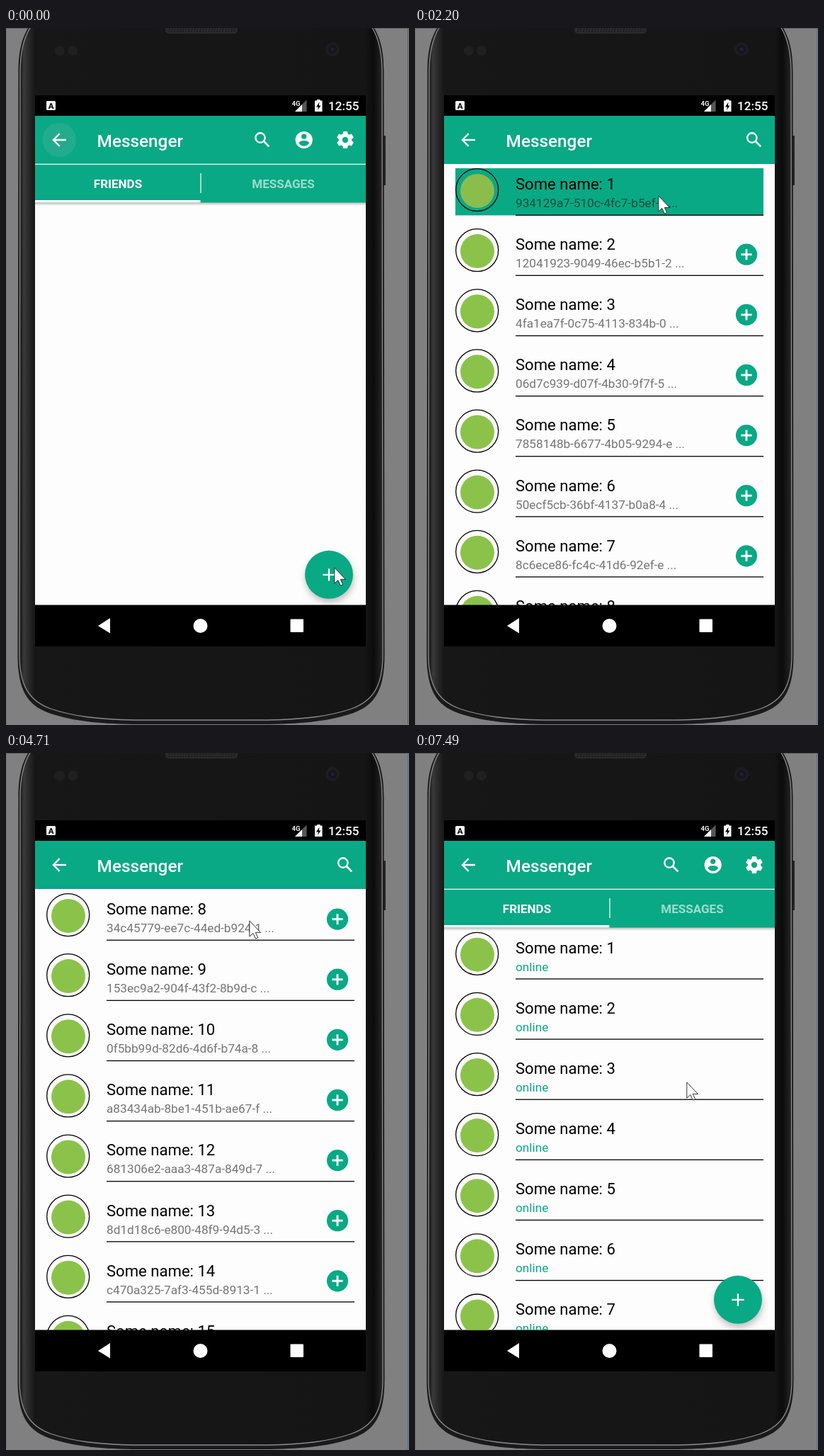
Write an HTML page with a canvas that moves like this. It is 569 px wide and 984 px high and loops after 8000 ms.

```html
<!DOCTYPE html>
<html lang="en">
<head>
<meta charset="utf-8">
<title>Messenger</title>
<style>
html, body { margin: 0; width: 100%; height: 100%; overflow: hidden; background: #808080; }
canvas { display: block; width: 100vw; height: 100vh; }
</style>
</head>
<body>
<canvas id="stage" width="569" height="984"></canvas>
<script>
const W = 569, H = 984, LOOP = 8000, PITCH = 85.12;
const GREEN = '#09a985', PAPER = '#fdfdfd', ROBOTO = 'Roboto, sans-serif';
const SCREEN = { x: 41, y: 95, w: 467, h: 778, bottom: 814.6 };

const codes = [
  '934129a7-510c-4fc7-b5ef-c', '12041923-9049-46ec-b5b1-2', '4fa1ea7f-0c75-4113-834b-0',
  '06d7c939-d07f-4b30-9f7f-5', '7858148b-6677-4b05-9294-e', '50ecf5cb-36bf-4137-b0a8-4',
  '8c6ece86-fc4c-41d6-92ef-e', '34c45779-ee7c-44ed-b924-1', '153ec9a2-904f-43f2-8b9d-c',
  '0f5bb99d-82d6-4d6f-b74a-8', 'a83434ab-8be1-451b-ae67-f', '681306e2-aaa3-487a-849d-7',
  '8d1d18c6-e800-48f9-94d5-3', 'c470a325-7af3-455d-8913-1'
];

const removals = [2440, 2960, 3080, 3720, 4120, 4540, 4710];
const presses = [[2200, 2420], [2680, 2930], [3480, 3690], [3870, 4090], [4330, 4510]];
const OPEN = 1110, TAP_BACK = 6680, CLOSE = 6920, CLOSED = 7170;

// Pointer keys: time, x, y
const pointer = [
  [395, 463, 761], [480, 443, 767], [1390, 443, 767], [1590, 377, 344], [1680, 377, 344],
  [1820, 353, 276], [1990, 343, 236], [5760, 343, 236], [5900, 255, 180], [6020, 150, 131],
  [6090, 110, 123], [6200, 73, 154], [7160, 73, 154], [7300, 260, 330], [7460, 383, 445],
  [7489, 383, 445], [7490, 383, 464]
];

const view = document.getElementById('stage').getContext('2d');
const layer = makeContext(), phone = makeContext();
let c = view;

function makeContext() {
  const canvas = document.createElement('canvas');
  canvas.width = W;
  canvas.height = H;
  return canvas.getContext('2d');
}

const clamp = v => Math.max(0, Math.min(1, v));
const span = (t, from, to) => clamp((t - from) / (to - from));

function box(x, y, w, h, color) {
  c.fillStyle = color;
  c.fillRect(x, y, w, h);
}

function disc(x, y, r, color) {
  c.fillStyle = color;
  c.beginPath();
  c.arc(x, y, r, 0, Math.PI * 2);
  c.fill();
}

function shape(points, fill) {
  c.beginPath();
  points.forEach(([x, y]) => c.lineTo(x, y));
  c.closePath();
  c.fillStyle = fill;
  c.fill();
}

function line(points, width, color) {
  c.beginPath();
  points.forEach(([x, y], i) => i ? c.lineTo(x, y) : c.moveTo(x, y));
  c.lineWidth = width;
  c.strokeStyle = color;
  c.stroke();
}

function label(str, x, y, size, color, weight = 400, align = 'left') {
  c.font = `${weight} ${size}px ${ROBOTO}`;
  c.textAlign = align;
  c.fillStyle = color;
  c.fillText(str, x, y);
}

function plus(x, y, r, width, color) {
  line([[x - r, y], [x + r, y]], width, color);
  line([[x, y - r], [x, y + r]], width, color);
}

// Phone outline, moved inwards at the sides and lifted at the bottom
function bodyPath(side, lift) {
  const left = 16.5 + side, right = 534.5 - side, base = 983 - lift;
  c.beginPath();
  c.moveTo(left + 16, -2);
  c.bezierCurveTo(left + 7, 12, left + 1, 30, left + 1, 62);
  c.lineTo(left, 885);
  c.bezierCurveTo(left, base - 48, left + 14, base - 27, left + 44, base - 16);
  c.bezierCurveTo(left + 76, base - 5, left + 112, base - 1, left + 162, base);
  c.lineTo(right - 162, base);
  c.bezierCurveTo(right - 112, base - 1, right - 76, base - 5, right - 44, base - 16);
  c.bezierCurveTo(right - 14, base - 27, right, base - 48, right, 885);
  c.lineTo(right - 1, 62);
  c.bezierCurveTo(right - 1, 30, right - 7, 12, right - 16, -2);
}

function drawPhone() {
  c = phone;
  box(0, 0, W, H, '#808080');
  box(0, 0, W, 1, '#626262');
  box(0, 0, 1, H, '#747474');
  box(532, 152, 4, 70, '#262626');

  bodyPath(0, 0);
  c.fillStyle = '#1a1a1a';
  c.fill();
  const sheen = c.createLinearGradient(17, 0, 534, 0);
  [[17, '#404040'], [21, '#1b1b1b'], [25, '#3a3a3a'], [32, '#292929'], [41, '#171717'],
   [508, '#151515'], [519, '#0b0b0b'], [527, '#1c1c1c'], [534, '#303030']]
    .forEach(([x, color]) => sheen.addColorStop((x - 17) / 517, color));
  bodyPath(2.5, 6);
  c.fillStyle = sheen;
  c.fill();
  c.lineWidth = 1.3;
  c.strokeStyle = '#8c8c8c';
  c.stroke();

  // Earpiece, sensors and front camera
  c.beginPath();
  c.roundRect(225, -8, 102, 16, 5);
  c.fillStyle = '#292929';
  c.fill();
  for (let x = 229; x < 325; x += 4) {
    for (let y = 1; y < 7; y += 3) box(x + y % 2, y, 2, 1, '#151515');
  }
  disc(76, 32, 7, '#202020');
  disc(94, 32, 7, '#202020');
  disc(461, 30, 10, '#1d1d1f');
  disc(461, 30, 6, '#15151f');
  disc(461, 30, 2.5, '#202038');

  box(SCREEN.x, SCREEN.y, SCREEN.w, SCREEN.h, '#000');
  shape([[130, 844], [147, 833], [147, 854.5]], '#fff');
  disc(274.5, 844, 10, '#fff');
  c.beginPath();
  c.roundRect(401.5, 834.5, 18.5, 18.5, 1);
  c.fill();
}

function statusIcons() {
  c.beginPath();
  c.roundRect(57, 103, 13, 13, 1.5);
  c.fillStyle = '#f2f2f2';
  c.fill();
  label('A', 63.5, 114, 11.5, '#000', 700, 'center');
  label('4G', 403.5, 109.5, 9.5, '#eee', 700);
  shape([[408, 118], [424.5, 118], [424.5, 101.5]], '#585858');
  shape([[408, 118], [418, 118], [418, 108]], '#fff');
  box(436, 102.5, 10.5, 15.5, '#fff');
  box(439, 101, 4.5, 2, '#fff');
  shape([[442.5, 104.5], [438, 111.5], [441, 111.5], [440, 116], [444.5, 109.5], [441.8, 109.5]], '#000');
  label('12:55', 498.5, 116, 17.1, '#fff', 500, 'right');
}

function searchIcon(x) {
  c.beginPath();
  c.arc(x - 3, 155, 6.7, 0, Math.PI * 2);
  c.lineWidth = 2.4;
  c.strokeStyle = '#fff';
  c.stroke();
  line([[x + 1.8, 159.8], [x + 9.4, 167.4]], 2.7, '#fff');
}

function accountIcon(x, y) {
  disc(x, y, 12.1, '#fff');
  disc(x, y - 4.9, 3.7, GREEN);
  c.beginPath();
  c.ellipse(x, y + 4.7, 7.3, 3.8, 0, Math.PI, 0);
  c.quadraticCurveTo(x + 4, y + 8.7, x, y + 8.7);
  c.quadraticCurveTo(x - 4, y + 8.7, x - 7.3, y + 4.7);
  c.fill();
}

function gearIcon(x, y) {
  disc(x, y, 9.2, '#fff');
  c.save();
  c.translate(x, y);
  for (let i = 0; i < 6; i++) {
    shape([[-3.9, -7], [-2.9, -12], [2.9, -12], [3.9, -7]], '#fff');
    c.rotate(Math.PI / 3);
  }
  c.restore();
  disc(x, y, 4.2, GREEN);
}

function toolbar(ripple) {
  box(41, 124, 467, 68, GREEN);
  if (ripple) disc(75, 158, 24 * ripple, 'rgba(180,180,180,.14)');
  line([[85, 158], [67, 158]], 2.4, '#fff');
  line([[75.6, 149.2], [66.9, 158], [75.6, 166.8]], 2.4, '#fff');
  label('Messenger', 128.6, 168, 24.32, '#fff', 500);
}

function row(n, y, note, noteColor, addable, pressed) {
  if (pressed) box(57, y + 198, 435, 66.5, GREEN);
  disc(88, y + 230, 24, pressed ? '#8bbd4d' : '#8bc34a');
  c.beginPath();
  c.arc(87.7, y + 228.6, 30, 0, Math.PI * 2);
  c.lineWidth = 1.3;
  c.strokeStyle = '#000';
  c.stroke();
  label('Some name: ' + n, 142, y + 228, 22.1, '#000');
  label(note, 142, y + 253, 17.2, noteColor);
  box(142, y + 263.6, 350, 1.3, '#000');
  if (addable && !pressed) {
    disc(468, y + 234.6, 15.1, GREEN);
    plus(468, y + 234.6, 7.6, 2.9, PAPER);
  }
}

function fab(press) {
  c.save();
  c.shadowColor = 'rgba(0,0,0,.25)';
  c.shadowBlur = 10 + 6 * press;
  c.shadowOffsetX = 1;
  c.shadowOffsetY = 5 + 3 * press;
  disc(456, 771.8, 34, GREEN);
  c.restore();
  if (press) disc(456, 771.8, 34 * press, 'rgba(255,255,255,.2)');
  plus(456, 771.8, 8.6, 2.3, '#fff');
}

function friendsScreen(t) {
  const filled = t > OPEN;
  box(41, 124, 467, 691, PAPER);
  if (filled) for (let i = 0; i < 7; i++) row(i + 1, 54.7 + i * PITCH, 'online', GREEN);

  const shade = c.createLinearGradient(0, 246, 0, 251);
  shade.addColorStop(0, 'rgba(0,0,0,.28)');
  shade.addColorStop(1, 'rgba(0,0,0,0)');
  box(41, 246, 467, 5, shade);

  toolbar(filled ? 0 : 1);
  searchIcon(362);
  accountIcon(420.7, 158);
  gearIcon(479, 158);
  box(41, 192, 467, 54.5, GREEN);
  box(41, 191.7, 467, 1.3, '#e8f6f2');
  box(274.4, 205, 1.2, 28, '#fff');
  box(41, 243, 233.5, 3.5, '#fff');
  label('FRIENDS', 158, 226, 17.03, '#fff', 700, 'center');
  label('MESSAGES', 391.5, 226, 17.03, 'rgba(255,255,255,.6)', 700, 'center');
  fab(filled ? 0 : span(t, 860, 1090));
}

function listScreen(t) {
  const top = 1 + removals.filter(at => at <= t).length;
  const pressed = presses.some(([down, up]) => t >= down && t < up);
  box(41, 124, 467, 691, PAPER);
  for (let i = 0; i < 8; i++) {
    const n = top + i;
    const note = codes[n - 1] ? codes[n - 1] + ' ...' : '';
    row(n, i * PITCH, note, 'rgba(0,0,0,.54)', true, pressed && !i);
  }
  toolbar(t < TAP_BACK ? 0 : span(t, TAP_BACK - 60, TAP_BACK + 140));
  searchIcon(478.8);
}

function overlayList(t) {
  const enter = span(t, OPEN, OPEN + 350);
  const leave = span(t, CLOSE, CLOSED);
  const dy = Math.round(62 * ((1 - enter) ** 5 + leave ** 4));
  const alpha = Math.min(1 - (1 - span(t, OPEN, OPEN + 200)) ** 4, 1 - span(t, CLOSE + 100, CLOSED));
  c = layer;
  c.clearRect(0, 0, W, H);
  listScreen(t);
  c = view;
  c.globalAlpha = alpha;
  const gray = Math.round(33 * (1 - span(t, 1420, 1590)));
  if (t < CLOSE) box(41, 95, 467, 29 + dy, `rgb(${gray},${gray},${gray})`);
  else box(41, 124, 467, dy, '#000');
  c.drawImage(layer.canvas, 0, dy);
  c.globalAlpha = 1;
}

function drawPointer(t) {
  let i = pointer.findIndex(key => key[0] > t);
  if (i < 0) i = pointer.length;
  const a = pointer[Math.max(0, i - 1)], b = pointer[Math.min(i, pointer.length - 1)];
  const k = b[0] > a[0] ? span(t, a[0], b[0]) : 0;
  const x = Math.round(a[1] + (b[1] - a[1]) * k), y = Math.round(a[2] + (b[2] - a[2]) * k);
  c.save();
  c.translate(x + .8, y + .9);
  shape([[0, 0], [0, 22.2], [5, 17.7], [8.6, 25.2], [11.9, 23.8], [8.5, 16.5], [15.7, 16.5]], '#fff');
  c.lineWidth = .9;
  c.lineJoin = 'round';
  c.strokeStyle = '#1c1c1c';
  c.stroke();
  c.restore();
}

function render(t) {
  c = view;
  c.drawImage(phone.canvas, 0, 0);
  box(567, 1, 1, 982, t < 710 ? '#5c5c5c' : '#4f7396');
  c.save();
  c.beginPath();
  c.rect(SCREEN.x, SCREEN.y, SCREEN.w, SCREEN.bottom - SCREEN.y);
  c.clip();
  if (t < OPEN + 200 || t >= CLOSE) friendsScreen(t);
  if (t >= OPEN && t < CLOSED) overlayList(t);
  statusIcons();
  c.restore();
  drawPointer(t);
}

function tick() {
  render(performance.now() % LOOP);
  requestAnimationFrame(tick);
}

drawPhone();
tick();
</script>
</body>
</html>
```
